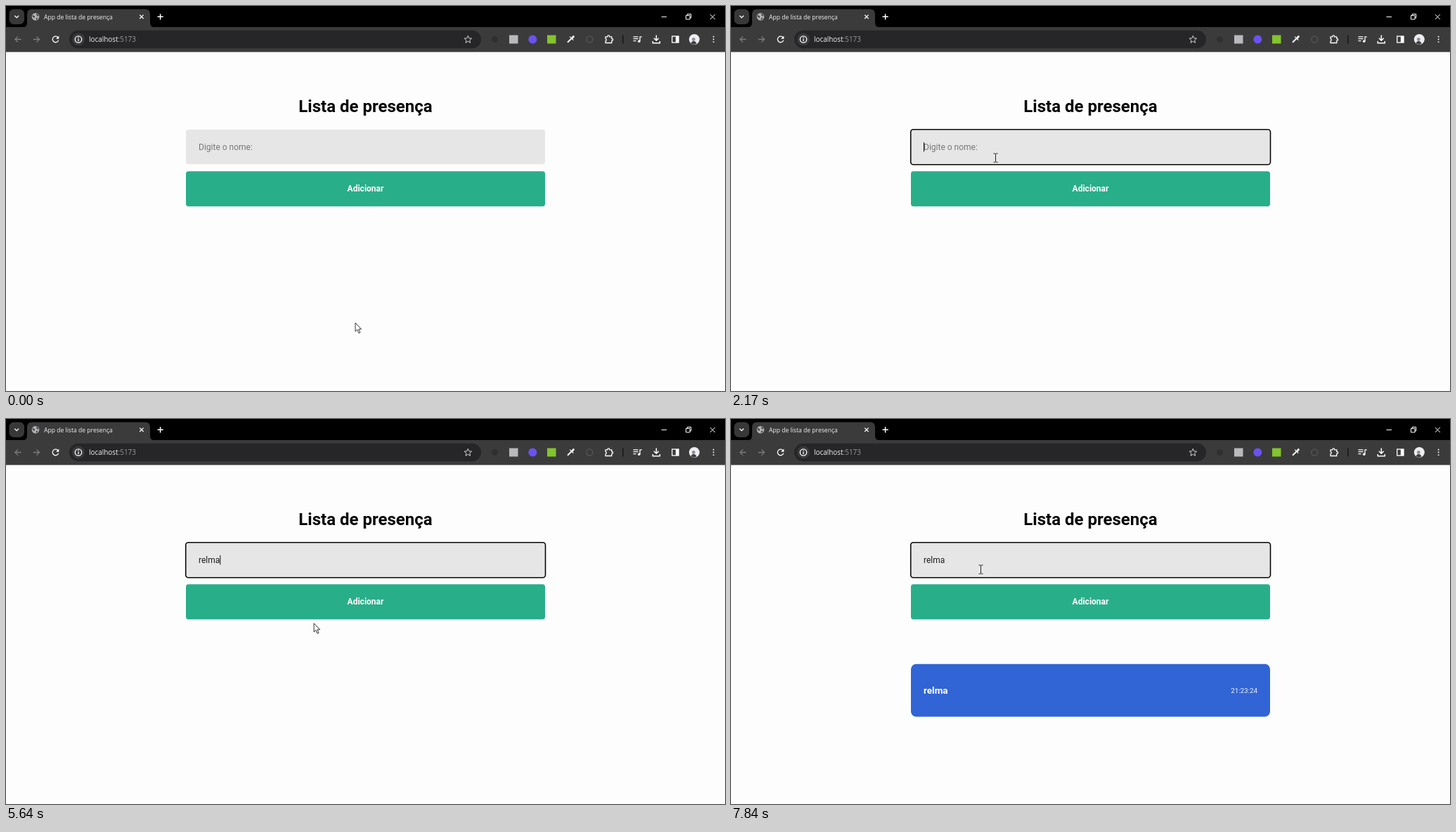
Animation of 1023x548 px, one loop 8 s. Source, as an HTML page:

```html
<!DOCTYPE html>
<html lang="pt-BR">
<head>
<meta charset="utf-8">
<title>App de lista de presença</title>
<style>
  html, body { margin: 0; width: 100%; height: 100%; overflow: hidden; background: #fdfdfd; }
  svg { display: block; width: 100%; height: 100%; }
  text { font-family: Roboto, sans-serif; font-size: 12px; white-space: pre; }
  .ui { font-family: "Open Sans", "Noto Sans", sans-serif; }
  .bold { font-weight: 700; }
  .line { fill: none; stroke: #fff; stroke-width: 1.3; }
  .dim { stroke: #7c7c7c; }
  .thin { stroke-width: 1; }
  .cursor { fill: #fff; stroke: #000; stroke-width: .8; stroke-linejoin: round; }
</style>
</head>
<body>
<svg viewBox="0 0 1023 548" xmlns="http://www.w3.org/2000/svg">
  <rect width="1023" height="548" fill="#fdfdfd"/>

  <!-- tab strip -->
  <rect width="1023" height="31" fill="#000"/>
  <rect x="4.5" y="4.500" width="21.500" height="21.500" rx="6.500" fill="#383838"/>
  <path class="line" d="M12.300 13.800l2.900 2.900 2.900-2.900"/>
  <path d="M23 30.500q7 0 7-7V11.500q0-7 7-7H198q7 0 7 7V23.500q0 7 7 7z" fill="#3b3b3b"/>
  <circle cx="42" cy="15.300" r="5.300" fill="#b4b5b8"/>
  <path d="M38 12.500l3.300 2.300-.6 2.500-3.200-2zM42.500 11l3 .8 1 3-2.500-.6zM43 17l2.500-.5-1.500 3.200-1.500-.4z" fill="#4a4a4c"/>
  <text class="ui" x="54" y="18.500" style="font-size:8.600px" fill="#f1f1f1">App de lista de presença</text>
  <path class="line" d="M190.200 12.600l5.400 5.400m0-5.400l-5.400 5.400"/>
  <path class="line" style="stroke-width:1.500" d="M215.500 15.300h8.200m-4.100-4.100v8.200"/>
  <path class="line thin" d="M932.500 15.500h7.500M967.500 13.500h5.500v5.500h-5.500zM969.200 13.300v-1.800h5.500v5.500h-1.700M1001.800 12l7 7m0-7l-7 7"/>

  <!-- toolbar -->
  <rect y="30" width="1023" height="35.500" fill="#3b3b3b"/>
  <rect x="90" y="34.800" width="586" height="25.400" rx="12.700" fill="#262628"/>
  <path class="line dim" d="M21.600 47.500h-8.600m4-4.100l-4.100 4.100 4.100 4.100M38.800 47.500h8.600m-4-4.100l4.100 4.100-4.100 4.100"/>
  <path class="line" d="M74.300 45.300a4.300 4.300 0 1 0 .4 3.300"/>
  <path d="M75.300 42.600v4.200h-4.200z" fill="#fff"/>
  <circle cx="103" cy="47.500" r="9" fill="#39393b"/>
  <circle class="line" cx="103" cy="47.500" r="4.700"/>
  <path class="line" d="M103 46.800v3.300M103 44.600v1.200"/>
  <text class="ui" x="118" y="51.200" style="font-size:9.930px" fill="#f0f0f0">localhost<tspan fill="#9a9a9d">:5173</tspan></text>
  <path class="line thin" style="stroke:#d2d2d2" d="M657.300 42.300l1.500 3.500 3.800.3-2.900 2.500.9 3.700-3.300-2-3.300 2 .9-3.700-2.900-2.500 3.800-.3z"/>

  <circle cx="695.500" cy="47.500" r="4.500" fill="#303031"/>
  <rect x="716" y="41.500" width="12.500" height="12" fill="#b9b9bb"/>
  <circle cx="749.300" cy="47.500" r="6" fill="#6c51ef"/>
  <rect x="770" y="41.500" width="12.500" height="12" fill="#83c32e"/>
  <path class="line" style="stroke-width:2" d="M799 51.800l5.700-5.700"/>
  <path class="line" d="M802.300 43.600l5 5"/>
  <path d="M804 45.400l2.400-2.800q1-1 2 0 1 1 0 2l-2.600 2.600z" fill="#fff"/>
  <circle cx="830.300" cy="47.500" r="4.500" fill="none" stroke="#535355" stroke-width="1.500"/>
  <path class="line" d="M853 43.800h2.800v-.4a1.500 1.500 0 0 1 3 0v.4h3v2.700h.3a1.500 1.500 0 0 1 0 3h-.3v3h-8.800v-2.700a1.700 1.700 0 0 0 0-3.300z"/>
  <path d="M877 41.500h1.500v12h-1.500z" fill="#161616"/>
  <path class="line" d="M892.500 43.800h7M892.500 46.700h7M892.500 49.600h4M902 50v-6.200h2.700"/>
  <circle cx="900.700" cy="50.300" r="1.800" fill="#fff"/>
  <path class="line" style="stroke-width:1.500" d="M925.300 41.500v7.500m-3.400-3.200l3.400 3.400 3.400-3.400M920.300 50v2.800h10V50"/>
  <rect class="line" x="947.700" y="43" width="9.300" height="9"/>
  <path d="M952.800 43h4.200v9h-4.200z" fill="#fff"/>
  <circle cx="979.300" cy="47.500" r="7.500" fill="#eeeef0"/>
  <circle cx="978.300" cy="47.500" r="2.400" fill="#8d9095"/>
  <path d="M974.500 53q1-3 4-3t4 3.500q-4 2.500-8-.5z" fill="#3c3e42"/>
  <path d="M1005.800 42.800h1.700v1.700h-1.700zm0 3.800h1.700v1.700h-1.700zm0 3.800h1.700v1.700h-1.700z" fill="#fff"/>

  <!-- page -->
  <text class="bold" x="511.500" y="151.300" text-anchor="middle" style="font-size:24px" fill="#060606">Lista de presença</text>
  <rect x="256" y="176" width="511" height="49.300" rx="3.700" fill="#e6e6e6"/>
  <rect id="ring" x="255.700" y="175.700" width="511.800" height="50" rx="3.700" fill="none" stroke="#080808" stroke-width="1.600"/>
  <text id="field" x="274" y="204.800"></text>
  <rect id="caret" y="194" width="1" height="13.500" fill="#111"/>
  <rect id="button" x="256" y="235.200" width="511" height="50" rx="3.700"/>
  <text id="label" class="bold" x="511.500" y="264.300" text-anchor="middle">Adicionar</text>
  <g id="card">
    <rect x="256" y="348.700" width="511" height="75" rx="7.500" fill="#3164d4"/>
    <text id="person" class="bold" x="274" y="390.600" style="font-size:13.500px" fill="#fff"></text>
    <text x="749" y="389.800" text-anchor="end" style="font-size:9.800px" fill="#f4f6fd">21:23:24</text>
  </g>

  <!-- pointers, hot spot at 0,0 -->
  <g id="pointer">
    <path id="arrow" class="cursor" d="M0 0V12.300L2.800 9.700 4.900 14.600 6.900 13.700 4.800 9H8.500z"/>
    <g id="hand" class="cursor">
      <path d="M-1.400 9V1.200Q-1.300 0 0 0T1.400 1.200V6.300Q2.700 5.300 4 6.600 5.300 5.700 6.300 7.100 8.300 6.700 8.300 8.800V12Q8.300 14 7 15.600V18H-.4V16.500Q-3 13.800-4.700 10.500-5.200 8.800-3.500 8.700-2.500 8.900-1.400 10.500z"/>
      <path d="M1.400 6.200V9M4 6.600V9.200M6.300 7.100V9.400" fill="none"/>
    </g>
    <path id="beam" d="M-3-6h2.300l.7.600.7-.6H3M0-5.500v11.500M-3 6.300h2.300l.7-.6.7.6H3" fill="none" stroke="#222" stroke-width="1"/>
  </g>
</svg>
<script>
const LOOP = 8000, STEP = 10, BLINK = 530, FADE = 400;
const NAME = "relma";
const keyTimes = [3430, 3570, 3870, 4270, 4530];
const focusTimes = [2170, 7270], blurTime = 6140, cardTime = 6340;

// pointer path: time, x, y
const path = [
  [0, 497, 451], [400, 499, 453], [930, 496, 450], [1300, 496, 450],
  [1400, 468, 412], [1630, 364, 247], [1780, 368, 229], [1930, 376.5, 216],
  [4940, 376.5, 216], [5100, 398, 215], [5240, 399, 216], [5370, 428, 306],
  [5450, 431, 308], [5770, 443, 279], [6440, 443, 279], [6740, 355.5, 214],
  [LOOP, 355.5, 214]
];

const el = {};
document.querySelectorAll("[id]").forEach(node => el[node.id] = node);
el.person.textContent = NAME;

const show = (node, on) => node.style.display = on ? "" : "none";
const shade = (rgb, k) => `rgb(${rgb.map(c => Math.round(c * k)).join()})`;

function pointerAt(t) {
  const i = Math.max(1, path.findIndex(p => p[0] > t));
  const [t0, x0, y0] = path[i - 1], [t1, x1, y1] = path[i];
  let u = (t - t0) / (t1 - t0);
  if (t0 === 6440) u = u * u * (3 - 2 * u);
  return { x: x0 + (x1 - x0) * u, y: y0 + (y1 - y0) * u };
}

function zoneAt({ x, y }) {
  if (x < 256 || x > 767) return "arrow";
  if (y >= 235 && y <= 285) return "hand";
  return y >= 176 && y <= 225 ? "beam" : "arrow";
}

// hover fades in and out at a constant rate along the path
const hover = [0];
for (let t = STEP; t <= LOOP; t += STEP) {
  const dir = zoneAt(pointerAt(t)) === "hand" ? 1 : -1;
  const last = hover[hover.length - 1];
  hover.push(Math.min(1, Math.max(0, last + dir * STEP / FADE)));
}

function drawField(t) {
  const typed = NAME.slice(0, keyTimes.filter(k => k <= t).length);
  const text = typed || "Digite o nome:";
  if (el.field.textContent !== text) el.field.textContent = text;
  el.field.setAttribute("fill", typed ? "#1c1c1c" : "#777");

  const focused = t >= focusTimes[0] && t < blurTime || t >= focusTimes[1];
  const reset = Math.max(0, ...[...focusTimes, ...keyTimes].filter(k => k <= t));
  const blinkOn = Math.floor((t - reset) / BLINK) % 2 === 0;
  show(el.ring, focused);
  show(el.caret, focused && blinkOn);
  el.caret.setAttribute("x", 274 + (typed ? el.field.getComputedTextLength() : 0));
}

function draw(now) {
  const t = now % LOOP;
  drawField(t);

  const light = 1 - 0.1 * hover[Math.floor(t / STEP)];
  el.button.setAttribute("fill", shade([41, 174, 138], light));
  el.label.setAttribute("fill", shade([255, 255, 255], light));
  show(el.card, t >= cardTime);

  const pos = pointerAt(t), zone = zoneAt(pos);
  el.pointer.setAttribute("transform", `translate(${pos.x} ${pos.y})`);
  ["arrow", "hand", "beam"].forEach(id => show(el[id], id === zone));
}

let start;
function frame(now) {
  start ??= now;
  draw(now - start);
  requestAnimationFrame(frame);
}
draw(0);
requestAnimationFrame(frame);
</script>
</body>
</html>
```
